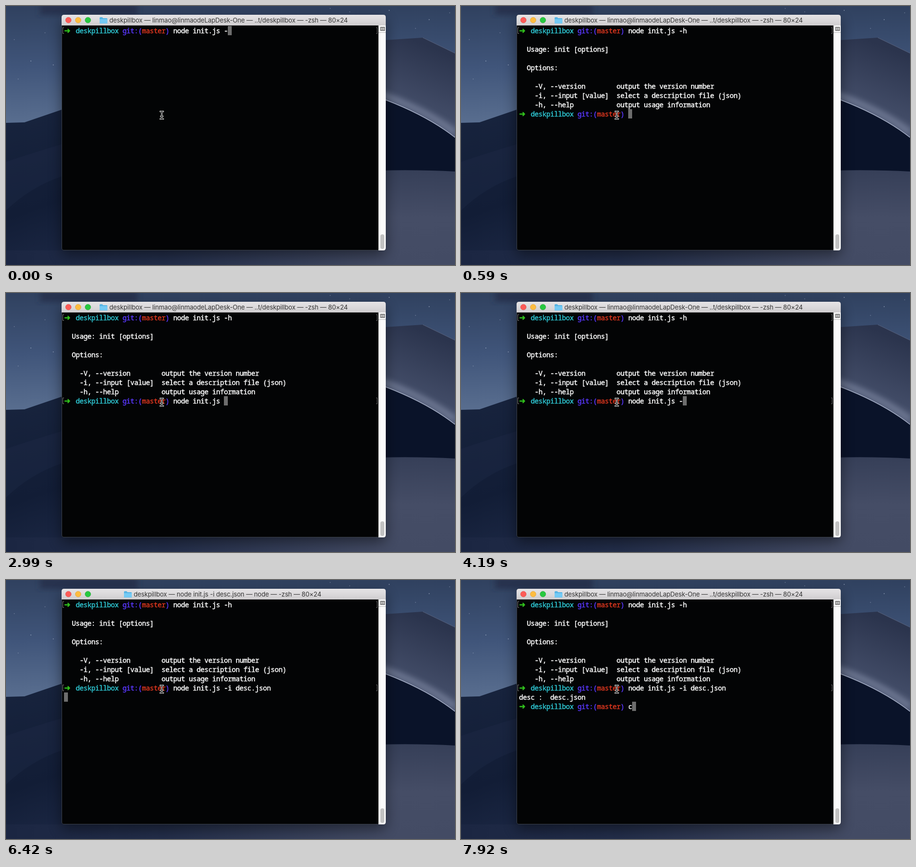
Animation, 921 px wide and 532 px high, one loop 8000 ms. Source, as an HTML page:

```html
<!DOCTYPE html>
<html lang="en">
<head>
<meta charset="utf-8">
<title>Terminal session</title>
<style>
  html, body { margin: 0; width: 100%; height: 100%; overflow: hidden; background: #1b2742; }
  svg { display: block; width: 100vw; height: 100vh; }
  text { white-space: pre; }
  #screen text { font: 500 14px "Noto Sans Mono", "DejaVu Sans Mono", monospace; letter-spacing: -.4px; stroke-width: .45px; }
  #screen .arrow { font: 16px "DejaVu Sans", sans-serif; }
  #title text { font: 13px Inter, Roboto, sans-serif; letter-spacing: -.13px; fill: #353535; }
</style>
</head>
<body>
<svg viewBox="0 0 921 532" xmlns="http://www.w3.org/2000/svg">
  <defs>
    <linearGradient id="sky" x2="0" y2="1">
      <stop offset="0" stop-color="#30415f"/><stop offset=".5" stop-color="#40557a"/><stop offset="1" stop-color="#5b7091"/>
    </linearGradient>
    <linearGradient id="leftDune" x2=".4" y2="1">
      <stop offset="0" stop-color="#18243e"/><stop offset=".6" stop-color="#121d36"/><stop offset="1" stop-color="#1d2946"/>
    </linearGradient>
    <linearGradient id="face" x1=".4" y1="0" x2=".1" y2="1">
      <stop offset="0" stop-color="#2b344d"/><stop offset=".55" stop-color="#414b66"/><stop offset="1" stop-color="#68718c"/>
    </linearGradient>
    <linearGradient id="sand" x2="0" y2="1">
      <stop offset="0" stop-color="#363f58"/><stop offset=".5" stop-color="#454d66"/><stop offset="1" stop-color="#434b64"/>
    </linearGradient>
    <linearGradient id="floor">
      <stop offset="0" stop-color="#1b2642"/><stop offset=".35" stop-color="#232e4a"/><stop offset=".83" stop-color="#434b64"/>
    </linearGradient>
    <linearGradient id="bar" x2="0" y2="1">
      <stop offset="0" stop-color="#e6e4e6"/><stop offset="1" stop-color="#cfcdcf"/>
    </linearGradient>
    <filter id="soft" x="-30%" y="-30%" width="160%" height="160%"><feGaussianBlur stdDeviation="6"/></filter>
    <filter id="shade" x="-20%" y="-20%" width="140%" height="140%"><feGaussianBlur stdDeviation="14"/></filter>
  </defs>

  <rect width="921" height="250" fill="url(#sky)"/>
  <rect x="70" y="-8" width="200" height="26" fill="#25324e" filter="url(#soft)"/>
  <g id="stars" fill="#c9d4e6"></g>
  <path d="M0 240L38 239L114 213H400V532H0Z" fill="url(#leftDune)"/>
  <path d="M0 320Q60 300 114 284V350Q50 372 0 420Z" fill="#1d2945" opacity=".45"/>
  <path d="M0 502H921V532H0Z" fill="url(#floor)"/>
  <path d="M760 72L779 70L855 65L921 97V280H760Z" fill="url(#face)"/>
  <path d="M855 65L921 97" stroke="#5f6983" stroke-width=".8"/>
  <path d="M760 178Q860 212 921 260" fill="none" stroke="#8c96b0" stroke-width="13" opacity=".55" filter="url(#soft)"/>
  <path d="M760 186L779 193Q865 226 921 270V350H760Z" fill="#0a1329"/>
  <path d="M779 193Q865 226 921 270" fill="none" stroke="#a4adc4" stroke-width="1.500"/>
  <path d="M760 338Q850 336 921 340V532H760Z" fill="url(#sand)"/>
  <rect x="114" y="28" width="665" height="484" rx="5" opacity=".45" filter="url(#shade)"/>

  <rect x="114" y="18" width="665" height="484" rx="5" fill="#030405"/>
  <path d="M114 40V23q0-5 5-5H774q5 0 5 5V40Z" fill="url(#bar)"/>
  <path d="M114.500 40V497q0 4.500 4.500 4.500H764" fill="none" stroke="#3b414b"/>
  <path d="M764 40H779V497q0 5-5 5H764Z" fill="#fbfbfb"/>
  <path d="M764 54.500H779" stroke="#bbb"/>
  <rect x="768.500" y="43.500" width="8" height="7" fill="#ddd" stroke="#444"/>
  <path d="M770 45.500H775M770 48.500H775" stroke="#555"/>
  <rect x="768" y="469" width="8" height="30" rx="4" fill="#c2c2c2"/>
  <g stroke-width=".7">
    <circle cx="128" cy="29" r="5.800" fill="#fc5b57" stroke="#df4744"/>
    <circle cx="148" cy="29" r="5.800" fill="#fdbc40" stroke="#dea034"/>
    <circle cx="168" cy="29" r="5.800" fill="#28c840" stroke="#1fa630"/>
  </g>

  <g id="title">
    <path d="M0 24.500q0-1.500 1.500-1.500H5.500l1.500 2H14.500q1.500 0 1.500 1.500V34.500q0 1.500-1.500 1.500H1.500q-1.500 0-1.500-1.500Z" fill="#56b4e4"/>
    <path d="M0 27H16V34.500q0 1.500-1.500 1.500H1.500q-1.500 0-1.500-1.500Z" fill="#74caf4"/>
    <text x="20" y="34"></text>
  </g>
  <g id="screen"></g>

  <defs>
    <path id="beam" d="M316.500 216.500q3 0 3 2.500v10.500q0 2.500-3 2.500M322.500 216.500q-3 0-3 2.500v10.500q0 2.500 3 2.500M317.500 226.500h4"/>
  </defs>
  <g fill="none" stroke-linecap="round">
    <use href="#beam" stroke="#f4f4f4" stroke-width="3"/>
    <use href="#beam" stroke="#000" stroke-width="1.200"/>
  </g>
</svg>
<script>
const LOOP = 8000, LEFT = 119, TOP = 41, CELL = 8, LINE = 19;
const DIR = 'deskpillbox', USER = 'linmao';
const WHITE = '#fff', BLUE = '#5a38ff';
const HELP_CMD = 'node init.js -h', INPUT_CMD = 'node init.js -i desc.json ';

// [time, characters typed]
const TYPING = [
  [[0, 14], [150, 15]],
  [[590, 0], [1190, 2], [1340, 3], [1640, 4], [1940, 5], [2390, 6], [2540, 7], [2690, 8],
   [2990, 13], [4190, 14], [4930, 15], [5230, 16], [5380, 17], [5680, 18], [5830, 26]],
  [[6720, 0], [7920, 1]]
];
const HELP = [
  [2, 2, 'Usage: init [options]'],
  [4, 2, 'Options:'],
  [6, 4, '-V, --version'], [6, 25, 'output the version number'],
  [7, 4, '-i, --input [value]'], [7, 25, 'select a description file (json)'],
  [8, 4, '-h, --help'], [8, 25, 'output usage information']
];

const screen = document.getElementById('screen');
const title = document.getElementById('title');
const titleText = title.querySelector('text');

const px = col => LEFT + col * CELL;
const py = row => TOP + row * LINE;
const put = (row, col, s, ink = WHITE, cls = '') =>
  `<text class="${cls}" x="${px(col)}" y="${py(row) + 15}" fill="${ink}" stroke="${ink}">${s}</text>`;
const block = (row, col, fill = '#6d6d6d', w = CELL) =>
  `<rect x="${px(col)}" y="${py(row)}" width="${w}" height="${LINE}" fill="${fill}"/>`;
const marks = row =>
  `<path d="M119 ${py(row) + 3.5}h-2.500v12h2.500M759.500 ${py(row) + 3.5}h2v12h-2" fill="none" stroke="#777"/>`;
const prompt = (row, cmd) =>
  put(row, 0, '➜', '#32c51e', 'arrow') +
  put(row, 3, DIR, '#2fc8d4') + put(row, 15, 'git:(', BLUE) +
  put(row, 20, 'master', '#dd371f') + put(row, 26, ')', BLUE) + put(row, 28, cmd);
const typed = (steps, t) => steps.reduce((n, [at, count]) => t >= at ? count : n, 0);

function titleAt(t) {
  const running = (cmd, proc) => `${DIR} — ${cmd.trim()}${proc} — -zsh — 80×24`;
  if (t >= 450 && t < 590) return [271, running(HELP_CMD, ' — node')];
  if (t >= 6420 && t < 6570) return [242, running(INPUT_CMD, ' — node')];
  if (t >= 6570 && t < 6720) return [267, running(INPUT_CMD, '')];
  return [192, `${DIR} — ${USER}@${USER}deLapDesk-One — ..t/${DIR} — -zsh — 80×24`];
}

function screenAt(t) {
  const [a, b, c] = TYPING.map(steps => typed(steps, t));
  let out = marks(0) + prompt(0, HELP_CMD.slice(0, a));
  if (t < 450) return out + block(0, 28 + a);
  if (t < 590) return out + block(1, 0);
  out += HELP.map(line => put(...line)).join('') + prompt(9, INPUT_CMD.slice(0, b));
  if (t >= 2990) out += marks(9);
  if (t < 6420) return out + block(9, 28 + b);
  if (t < 6570) return out + block(10, 0);
  out += put(10, 0, 'desc :  desc.json');
  if (t < 6720) return out + block(11, 0, WHITE) + put(11, 0, '%', '#000') + block(11, 80, '#6d6d6d', 3);
  return out + prompt(11, 'c'.slice(0, c)) + block(11, 28 + c);
}

let shown = '';
function draw(t) {
  const [x, label] = titleAt(t), body = screenAt(t);
  if (shown === label + body) return;
  shown = label + body;
  title.setAttribute('transform', `translate(${x})`);
  titleText.textContent = label;
  screen.innerHTML = body;
}

document.getElementById('stars').innerHTML =
  [[51, 113], [25, 150], [17, 69], [97, 121], [80, 55], [665, 5], [786, 9], [705, 12], [840, 46], [868, 28], [910, 14]]
    .map(([x, y], i) => `<circle cx="${x}" cy="${y}" r=".8" opacity="${i % 3 ? .5 : .85}"/>`).join('');

const start = performance.now();
function tick() {
  draw((performance.now() - start) % LOOP);
  requestAnimationFrame(tick);
}
tick();
</script>
</body>
</html>
```
